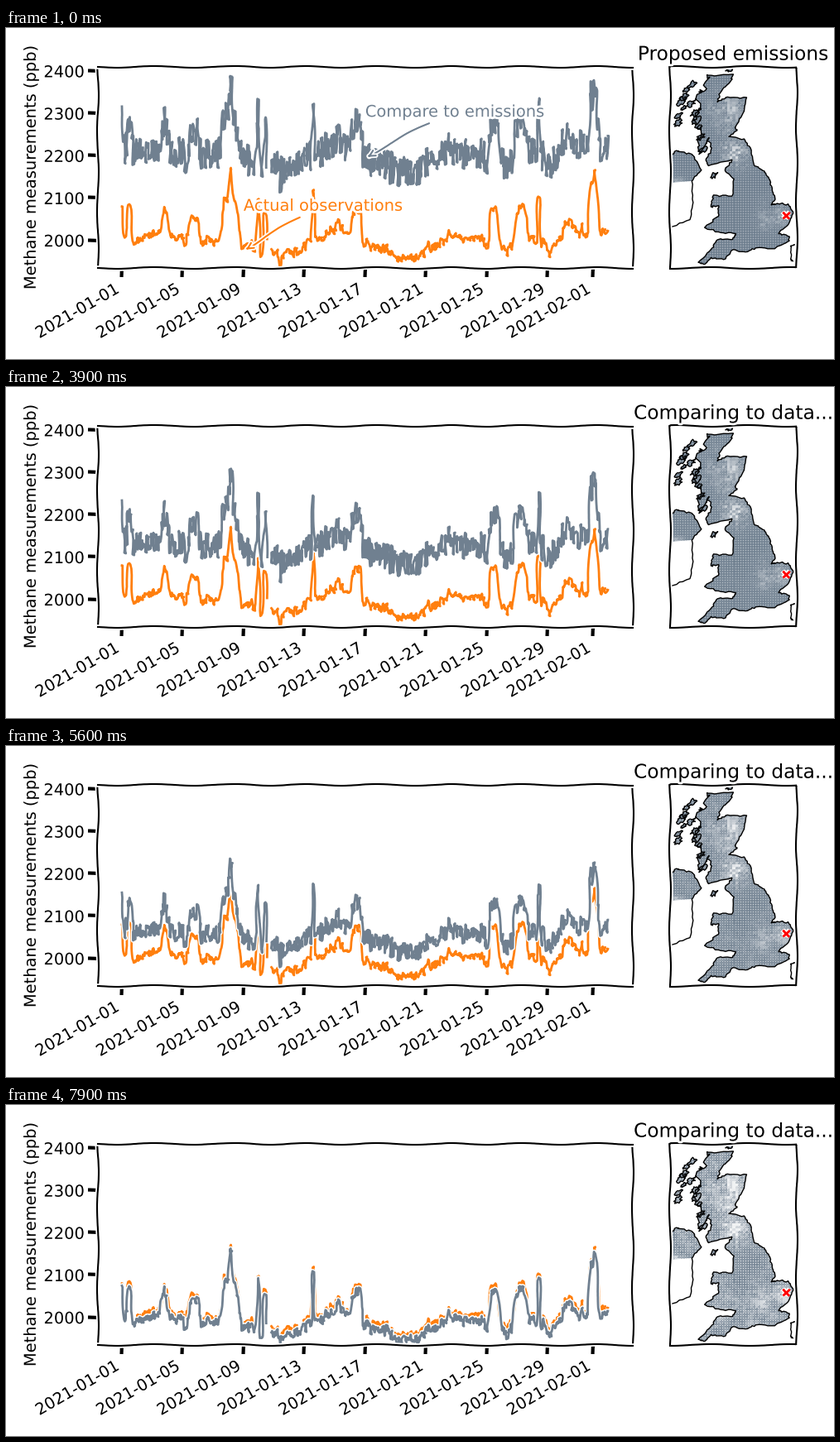
These frames come from a looping animation (1000 px wide and 400 px high, 8 s). A matplotlib script:

```python
import numpy as np
import matplotlib.pyplot as plt
from matplotlib.animation import FuncAnimation
from matplotlib.colors import to_rgb
from matplotlib.path import Path

plt.xkcd()
plt.rcParams["font.family"] = "DejaVu Sans"

SLATE, ORANGE = "slategray", "tab:orange"
START_FRAME, FRAMES, INTERVAL = 30, 80, 100
CELL = 3
LEFT, RIGHT, TOP, BOTTOM = 802, 955, 47, 290
rng = np.random.default_rng(7)

# Slow background as (day, ppb) and plumes as (day, height, half width)
BACKGROUND = [(0, 2018), (6, 2000), (8.4, 1978), (11.3, 1970), (14.2, 2032),
              (16, 1995), (18.7, 1958), (22, 2020), (25.4, 1985),
              (26.5, 2022), (28, 1970), (29.2, 2030), (32, 2018)]
PLUMES = [(0, 62, 0.1), (0.5, 65, 0.15), (2.8, 62, 0.25), (4.8, 50, 0.4),
          (7.1, 115, 0.6), (7.17, 70, 0.12), (8.95, 130, 0.1),
          (9.4, 95, 0.15), (12.58, 115, 0.08), (15.45, 70, 0.35),
          (24.5, 80, 0.3), (26.2, 55, 0.4), (27.42, 115, 0.12),
          (31, 128, 0.3)]

# Main capes and bays as (longitude, latitude), clockwise
MAINLAND = [
    (-5.0, 58.6), (-3.05, 58.64), (-3.1, 58.4), (-4.0, 57.85), (-4.2, 57.5),
    (-3.4, 57.7), (-1.9, 57.68), (-2.1, 57.1), (-2.8, 56.4), (-2.65, 56.27),
    (-3.3, 56.0), (-2.1, 55.9), (-1.6, 55.5), (-1.3, 54.7), (-0.5, 54.45),
    (-0.15, 54.1), (0.1, 53.6), (0.34, 53.15), (0.05, 52.88), (0.5, 52.95),
    (1.35, 52.93), (1.76, 52.5), (1.3, 51.9), (0.6, 51.5), (1.43, 51.37),
    (1.35, 51.12), (0.3, 50.76), (-1.2, 50.8), (-2.0, 50.6), (-2.95, 50.72),
    (-3.7, 50.22), (-4.7, 50.32), (-5.2, 49.97), (-5.7, 50.08), (-4.6, 50.8),
    (-4.2, 51.2), (-3.0, 51.22), (-2.75, 51.5), (-3.9, 51.55), (-5.2, 51.8),
    (-4.1, 52.35), (-4.1, 52.85), (-4.7, 52.8), (-4.5, 53.35), (-3.05, 53.3),
    (-2.9, 54.1), (-3.6, 54.5), (-3.05, 54.97), (-4.9, 54.7), (-5.1, 54.95),
    (-4.65, 55.5), (-4.85, 55.95), (-5.65, 55.33), (-5.5, 56.4),
    (-6.1, 56.7), (-5.5, 57.2), (-5.8, 57.8), (-5.2, 57.95), (-5.0, 58.6),
]
IRELAND = [(-8.0, 55.15), (-7.4, 55.38), (-6.2, 55.22), (-5.45, 54.5),
           (-6.2, 54.0), (-6.1, 53.0), (-6.35, 52.18), (-8.0, 51.8)]
FRANCE = [(1.85, 50.96), (1.6, 50.87), (1.55, 50.25), (1.7, 50.15)]


def project(points):
    """Mercator projection into stage pixels."""
    lon, lat = np.transpose(points)
    northing = np.degrees(np.arcsinh(np.tan(np.radians(lat))))
    return np.column_stack([836 + (lon + 5.7) * 15.4,
                            286 - (northing - 57.85) * 15.4])


def coastline(points, parts=6):
    """Subdivide a coast and jitter it, most of all in the north-west."""
    xy = project(points)
    index = np.arange((len(xy) - 1) * parts + 1) / parts
    fine = np.column_stack([np.interp(index, np.arange(len(xy)), column)
                            for column in xy.T])
    x, y = fine.T
    wobble = np.where((x > 815) & (x < 850) & (y < 150), 2.2, 0.6)
    return fine + (wobble * (index % 1 > 0))[:, None] * rng.normal(
        size=fine.shape)


def island(x, y, size):
    turn = np.linspace(0, 2 * np.pi, 17)
    reach = size * rng.uniform(0.5, 1.5, turn.size)
    reach[-1] = reach[0]
    return np.column_stack([x + reach * np.cos(turn) - 0.6 * reach * np.sin(turn),
                            y + 1.1 * reach * np.sin(turn)])


def island_chain(start, end, count):
    return [island(*(center + rng.normal(0, 1.5, 2)), rng.uniform(2, 4.5))
            for center in np.linspace(start, end, count)]


def closed(xy):
    return Path(np.vstack([xy, xy[:1]]), closed=True)


def blob(x, y, radius):
    return np.exp(-((cell_x - x) ** 2 + (cell_y - y) ** 2) / (2 * radius ** 2))


def smooth(field, reach=2):
    """Blur by averaging shifted copies, then stretch to 0..1."""
    shifts = range(-reach, reach + 1)
    blurred = sum(np.roll(field, (i, j), (0, 1)) for i in shifts for j in shifts)
    return (blurred - blurred.min()) / np.ptp(blurred)


# Time series
days = np.arange(0, 32, 1 / 24)
memory = np.exp(-np.arange(12) / 3)
weather = np.convolve(rng.normal(0, 6, days.size), memory)[:days.size]
observed = np.interp(days, *np.transpose(BACKGROUND)) + weather
for center, height, width in PLUMES:
    observed += height * np.exp(-((days - center) / width) ** 4)
observed[(days > 9.55) & (days < 9.8)] = np.nan
noise = rng.uniform(-1, 1, days.size)

fig = plt.figure(figsize=(10, 4), dpi=100)
ax = fig.add_axes([0.1106, 0.275, 0.6468, 0.6075])
ax.plot(days, observed, color=ORANGE)
model_line, = ax.plot(days, observed, color=SLATE)
ax.set_xlim(-1.6, 33.62)
ax.set_ylim(1934.7, 2409.7)
ax.set_yticks(range(2000, 2401, 100))
tick_days = [*range(0, 29, 4), 31]
ax.set_xticks(tick_days,
              [str(np.datetime64("2021-01-01") + day) for day in tick_days],
              rotation=30, ha="right")
ax.set_ylabel("Methane measurements (ppb)")


def add_note(text, tip, position, color):
    arrow = dict(arrowstyle="->", color=color, lw=1.5,
                 connectionstyle="arc3,rad=0.05")
    return ax.annotate(text, tip, position, color=color, arrowprops=arrow)


notes = [
    add_note("Compare to emissions", (16, 2193), (16, 2292), SLATE),
    add_note("Actual observations", (8, 1974), (8, 2070), ORANGE),
]

# Map
map_ax = fig.add_axes([0.802, 0.275, 0.153, 0.6075])
mainland, ireland, france = map(coastline, (MAINLAND, IRELAND, FRANCE))
islands = [
    *island_chain((825, 68), (809, 112), 7),
    *island_chain((828, 92), (842, 143), 6),
    island(855, 178, 3), island(874, 50, 3),
]
ulster = np.vstack([ireland[ireland[:, 1] < 187], [(LEFT, 187)]])
land = Path.make_compound_path(*map(closed, [mainland, ulster, *islands]))

rows, columns = (BOTTOM - TOP) // CELL, (RIGHT - LEFT) // CELL
cell_x, cell_y = np.meshgrid(LEFT + CELL * (np.arange(columns) + 0.5),
                             TOP + CELL * (np.arange(rows) + 0.5))
speckle, drift, patches = rng.random((3, rows, columns))
patches = smooth(patches)
pale_areas = (blob(868, 98, 16) + blob(880, 150, 14) + blob(925, 225, 12)
              + blob(810, 187, 7))
drift = (0.4 * drift + 0.8 * patches ** 2) * (1 - 0.6 * blob(895, 195, 20))
seam = np.full((CELL, CELL), 0.1)
seam[1:, 1:] = 0
seam[0, 0] = 0.4
seams = np.tile(seam, (rows, columns))
slate = np.array(to_rgb(SLATE))


def emission_image(progress, settled):
    pale = pale_areas * patches * (0.2 + 0.9 * speckle) + 0.6 * progress * drift
    if settled:
        pale = pale + 0.1 * speckle * blob(916, 220, 9)
    pale = np.kron(np.clip(pale, 0, 0.9), np.ones((CELL, CELL)))
    pale = np.maximum(pale, seams * (1 + progress))
    return slate + (1 - slate) * pale[..., None]


emissions = map_ax.imshow(
    emission_image(0, False), extent=(LEFT, RIGHT, BOTTOM, TOP),
    aspect="auto", interpolation="nearest")
emissions.set_clip_path(land, map_ax.transData)
for coast in [mainland, ireland, france, *islands]:
    map_ax.plot(*coast.T, color="black", lw=1, path_effects=[],
                sketch_params=None)
map_ax.plot(942, 226, "x", color="red", ms=6, mew=2)
map_ax.set(xlim=(LEFT, RIGHT), ylim=(BOTTOM, TOP), xticks=[], yticks=[])
map_ax.spines[:].set_visible(False)
map_ax.add_patch(plt.Polygon(
    [(LEFT, BOTTOM), (LEFT, TOP), (RIGHT, TOP), (RIGHT, BOTTOM)],
    fill=False, ec="black", lw=1.5, zorder=2.5, clip_on=False))
title = map_ax.set_title("Proposed emissions")


def update(frame):
    progress = max(frame - START_FRAME, 0) / (FRAMES - 1 - START_FRAME)
    # The model closes in on the observations, fast at first
    offset = 203 - 214 * progress ** 0.6
    spread = 6 + 29 * (1 - progress)
    model_line.set_ydata(observed + offset + spread * noise)
    emissions.set_data(emission_image(progress, frame > 0))
    for note in notes:
        note.set_visible(frame <= START_FRAME)
    title.set_text("Proposed emissions" if frame < START_FRAME
                   else "Comparing to data...")
    return model_line, emissions, title, *notes


animation = FuncAnimation(fig, update, frames=FRAMES, interval=INTERVAL,
                          repeat=True, repeat_delay=0, blit=False)
plt.show()
```
